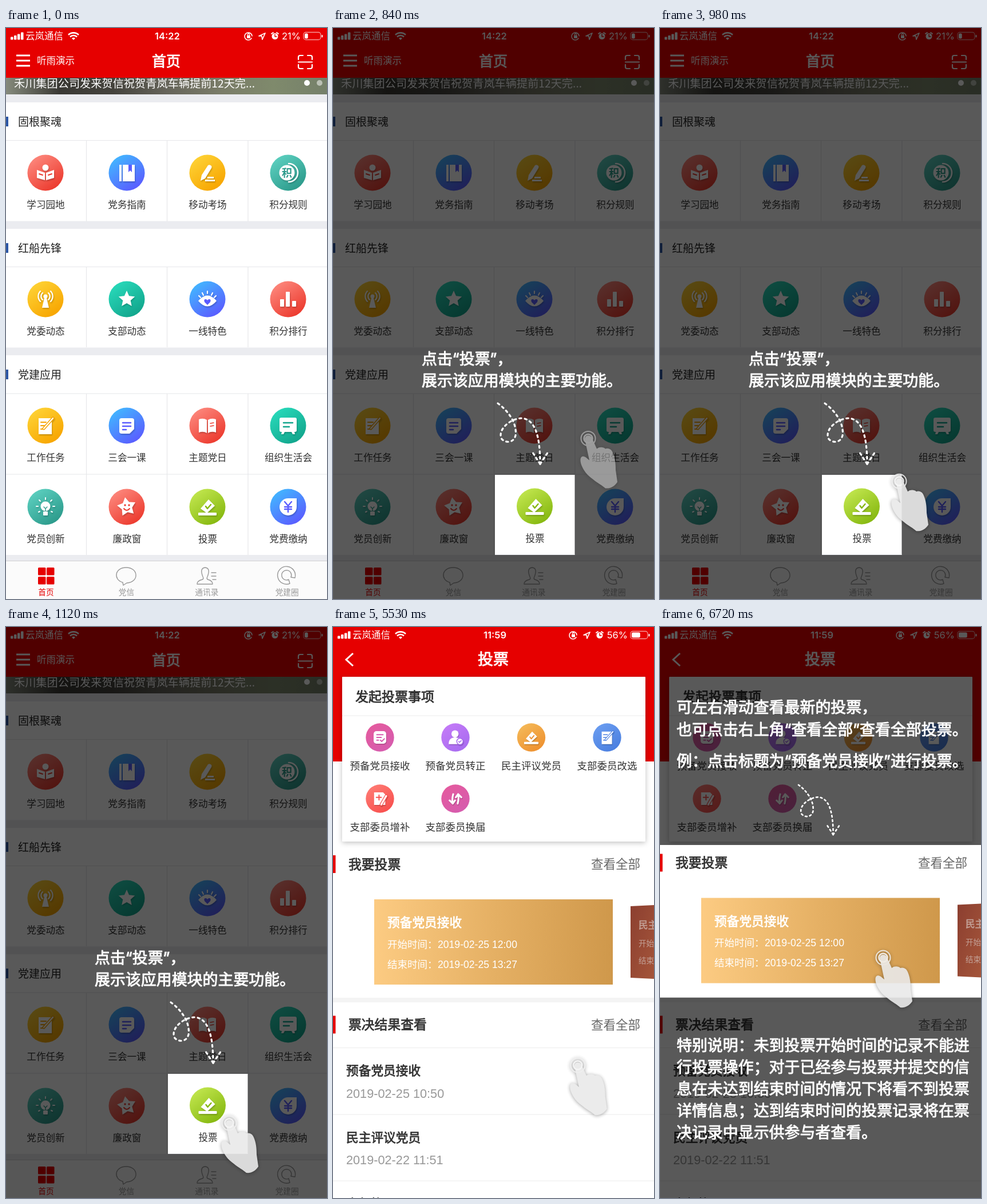
Animation, 561 px wide and 998 px high, one loop 8 s. Source, as an HTML page:

```html
<!DOCTYPE html>
<html lang="zh-CN">
<head>
<meta charset="utf-8">
<title>投票演示</title>
<style>
html, body { margin: 0; width: 100%; height: 100%; overflow: hidden; background: #fff; }
svg { display: block; width: 100%; height: 100%; }
text { font-family: "Noto Sans CJK SC", "Noto Sans CJK", sans-serif; white-space: pre; stroke-width: 0; }
.bold { stroke-width: .035em; stroke-linejoin: round; }
.latin { font-family: "Liberation Sans", sans-serif; }
.tip text, .clock { font-family: Inter, "Noto Sans CJK SC", "Noto Sans CJK", sans-serif; }
.glyph { filter: drop-shadow(1px 2px 1px rgba(0,0,0,.2)); }
.card { filter: drop-shadow(0 2px 5px rgba(0,0,0,.25)); }
#hand { filter: drop-shadow(0 1px 3px rgba(0,0,0,.4)); }
</style>
</head>
<body>
<svg id="stage" viewBox="0 0 561 998"></svg>
<script>
const RED = '#e60000', BOLD = 'class="bold"', MID = 'text-anchor="middle"', END = 'text-anchor="end"';

// Shape helpers; text is placed by its vertical centre.
const text = (x, y, size, str, fill = '#333', attrs = '') =>
  `<text x="${x}" y="${y + size * .38}" font-size="${size}" fill="${fill}" stroke="${fill}" ${attrs}>${str}</text>`;
const rect = (x, y, w, h, fill, rx = 0, attrs = '') =>
  `<rect x="${x}" y="${y}" width="${w}" height="${h}" rx="${rx}" fill="${fill}" ${attrs}/>`;
const circle = (x, y, r, fill = '#fff', attrs = '') => `<circle cx="${x}" cy="${y}" r="${r}" fill="${fill}" ${attrs}/>`;
const shape = (d, fill = '#fff') => `<path d="${d}" fill="${fill}"/>`;
const line = (d, stroke = '#fff', w = 2.5, attrs = 'stroke-linecap="round" stroke-linejoin="round"') =>
  `<path d="${d}" fill="none" stroke="${stroke}" stroke-width="${w}" ${attrs}/>`;
const star = (R, r) => 'M' + Array.from({ length: 10 }, (_, i) => {
  const a = i * Math.PI / 5 - Math.PI / 2, q = i % 2 ? r : R;
  return (q * Math.cos(a)).toFixed(1) + ' ' + (q * Math.sin(a)).toFixed(1);
}).join('L') + 'Z';

const palette = {
  red: ['#ff9287', '#ec3a2e'], blue: ['#3fc3ff', '#5a5cff'], yellow: ['#ffd83c', '#f7a500'],
  jade: ['#62d6c6', '#2c9a8b'], teal: ['#2be0c0', '#12a58c'], green: ['#c9ec56', '#86b810'],
  gold: ['#f5bd5c', '#ee9130'], pink: ['#e65a9c', '#d65cae'], purple: ['#c77cf8', '#a86cf0'],
  sky: ['#6ea0f2', '#4a7fe0'], coral: ['#ff8078', '#f8504e']
};
const gradient = (id, stops, x2, y2) => `<linearGradient id="${id}" x1="0" y1="0" x2="${x2}" y2="${y2}">` +
  stops.map((c, i) => `<stop offset="${i / (stops.length - 1)}" stop-color="${c}"/>`).join('') + '</linearGradient>';

// White symbols drawn around 0,0; c is the colour of their cut-out details.
const glyphs = {
  reader: c => circle(0, -9, 5.5) + shape('M-15-5L-1 0V13L-15 9ZM15-5L1 0V13L15 9Z') + line('M-11 2l6 2M11 2l-6 2', c, 2),
  book: c => rect(-13, -14, 4, 29, '#fff') + rect(-7, -14, 21, 29, '#fff') + shape('M3-14h6v13l-3-3-3 3Z', c),
  pencil: () => shape('M-12 14l2-10L1-13q3-2 6 1 1 2 0 4L-4 10Z') + rect(0, 7, 11, 3, '#fff') + rect(-4, 12, 17, 3, '#fff'),
  points: c => circle(-2, 0, 13.5) + line('M1-16A16 16 0 0 1 1 16', '#fff', 2.5) + text(-2, 0, 18, '积', c, MID + ' font-weight="700"'),
  antenna: () => circle(0, -5, 3.5) + shape('M-2-2h4l4 17h-12Z') +
    line('M-5 1a8 8 0 0 1 0-12M5 1a8 8 0 0 0 0-12M-9 4a13 13 0 0 1 0-18M9 4a13 13 0 0 0 0-18', '#fff', 2.2),
  star: () => shape(star(15, 7)),
  eye: c => shape('M-16 3Q0-16 16 3Q0 22-16 3Z') + shape('M0 10l-5-5q-2-5 2-5 2 0 3 2 1-2 3-2 4 0 2 5Z', c) +
    line('M0-14v4M-9-11l2 4M9-11l-2 4M-15-6l3 3M15-6l-3 3', '#fff', 2.2),
  bars: () => rect(-14, 0, 7, 13, '#fff', 1) + rect(-4, -13, 7, 26, '#fff', 1) + rect(7, 3, 7, 10, '#fff', 1),
  task: c => rect(-12, -13, 23, 28, '#fff') + line('M-8-6h9M-8 0h6M-8 6h6', c, 2) + line('M-3 5L13-13', c, 5) + line('M-3 5L13-13', '#fff', 2.2),
  minutes: c => shape('M-9-13h18q4 0 4 4V6l-8 8H-9q-4 0-4-4V-9q0-4 4-4Z') + line('M-7-5H7M-7 1H7M-7 7h6', c),
  pages: c => shape('M-15-11q8-3 14 1V13q-6-4-14-1ZM15-11q-8-3-14 1V13q6-4 14-1Z') + line('M5-4l6-1M5 1l6-1', c, 1.5),
  board: c => shape('M-12-14h24q3 0 3 3V8q0 3-3 3h-1l1 4h-4l-2-4h-12l-2 4h-4l1-4h-1q-3 0-3-3v-19q0-3 3-3Z') + line('M-8-5H8M-8 2H2', c),
  bulb: c => circle(0, -1, 8.5) + rect(-4, 8, 8, 7, '#fff', 1) + line('M-3 0l3 3 3-3M0 3v4', c, 1.4) +
    line('M0-16v3M-11-12l2 2M11-12l-2 2M-16-1h3M16-1h-3M-12 9l2-1M12 9l-2-1', '#fff', 2),
  smile: c => `<g transform="rotate(-10)">${shape(star(17, 9.5))}</g>` + circle(-3, -3, 1.7, c) + circle(4, -3, 1.7, c) + line('M-5 3q5 6 10 0', c, 2),
  vote: c => shape('M-12 3L2-13 13-2-1 11Z') + line('M-3-1l3 4 6-7', c) + rect(-16, 10, 32, 5, '#fff', 1),
  fee: c => shape('M15-15V0A15 15 0 1 1 0-15Z') + line('M-6-9l6 7 6-7M0-2V9M-6 0H6M-6 4H6', c, 2.4),
  form: c => rect(-14, -14, 28, 28, '#fff', 6) + line('M-7-6H7M-7 0H3M-7 6h4M1 6l3 3 6-6', c),
  member: c => circle(-1, -8, 8) + shape('M-15 15q0-15 14-15t14 15Z') + circle(10, 9, 7, '#fff', `stroke="${c}" stroke-width="2"`) + line('M7 9l2 2 4-4', c, 2),
  add: c => shape('M-13-14h20l5 5v23h-25Z') + line('M-8-3H3M-2-8V3', c) + line('M3 13L14-6', c, 7) + line('M3 13L14-6', '#fff', 4),
  swap: () => line('M-5-10Q-8 0-6 11M-13 4l7 7 5-7M5 11Q8 0 6-10M13-3l-7-7-5 7', '#fff', 4)
};
const icon = (x, y, r, tone, glyph) =>
  circle(x, y, r, `url(#${tone})`) +
  `<g class="glyph" transform="translate(${x} ${y}) scale(${r / 31.5})">${glyphs[glyph](palette[tone][1])}</g>`;

const statusBar = (time, timeX, percent, level, dx) =>
  [5, 7.5, 10, 13].map((h, i) => rect(8 + i * 6, 20.5 - h, 4.5, h, '#fff', 1)).join('') +
  text(34, 14, 16.5, '云岚通信', '#fff') +
  line('M109 12a13 13 0 0 1 18 0M112 15.5a8.5 8.5 0 0 1 12 0', '#fff', 2.6, '') + shape('M118 21l-3-3a4.2 4.2 0 0 1 6 0Z') +
  text(timeX, 14, 16.5, time, '#fff', MID + ' class="clock" font-weight="600"') +
  `<g transform="translate(${dx} 0)">` +
  line('M429 18a6.5 6.5 0 1 1 1-4', '#fff', 1.6) + rect(421, 13, 6, 5, '#fff', 1) + line('M422.5 13v-2a1.5 1.5 0 0 1 3 0v2', '#fff', 1.3) +
  line('M442 14l11-5-5 11-1-6Z', '#fff', 1.7) +
  circle(470, 14.5, 5.5) + line('M470 11v4h3', RED, 1.4) + line('M464 10l3-2M476 10l-3-2', '#fff', 2) + '</g>' +
  text(515, 14, 16.5, percent, '#fff', END + ' class="clock"') +
  rect(520, 7.5, 30, 13, 'none', 4, 'stroke="#fff" stroke-opacity=".6" stroke-width="1.3"') +
  rect(522, 9.5, 26 * level, 9, '#fff', 2) + rect(551.5, 12, 2, 4.5, '#fff', 1);

const columns = [69, 211, 352, 493];
const iconRow = (y, items) => items.map(([label, tone, glyph], i) =>
  icon(columns[i], y, 31.5, tone, glyph) + text(columns[i] + .5, y + 56, 16.6, label, '#333', MID)).join('');
const section = (y, title) => rect(0, y - 9, 4, 17, '#2b56a5') + text(21, y, 19, title, '#222');
const grid = (top, bottom) => line(`M0 ${top}H561` + [140.5, 281.5, 423].map(x => `M${x} ${top}V${bottom}`).join(''), '#e6e7ea', 1.2, '');

const home = rect(0, 0, 561, 998, '#fff') + rect(0, 0, 561, 87, RED) + statusBar('14:22', 282, '21%', .22, 0) +
  line('M18 48H42M18 57H42M18 66H42', '#fff', 3.2, '') + text(54, 57, 16.5, '听雨演示', '#fff') +
  text(280, 57, 25, '首页', '#fff', MID + ' ' + BOLD) +
  line('M511 55v-4q0-3 3-3h5M527 48h5q3 0 3 3v4M535 64v4q0 3-3 3h-5M519 71h-5q-3 0-3-3v-4M511 59.5H535', '#fff', 2.2) +
  rect(0, 87, 561, 29, 'url(#photo)') +
  text(14, 96.5, 19.2, '禾川集团公司发来贺信祝贺青岚车辆提前12天完...', '#fff') +
  circle(526, 96, 5) + circle(548, 96, 5, '#fff', 'opacity=".5"') +
  [[116, 14], [337.5, 13.5], [558.5, 13.5], [921, 10]].map(([y, h]) => rect(0, y, 561, h, '#ebecf0')).join('') +
  grid(196.5, 338) + grid(417.5, 558) + grid(639, 921) + line('M0 780H561', '#e6e7ea', 1.2, '') +
  section(164, '固根聚魂') + section(385, '红船先锋') + section(606, '党建应用') +
  iconRow(253, [['学习园地', 'red', 'reader'], ['党务指南', 'blue', 'book'], ['移动考场', 'yellow', 'pencil'], ['积分规则', 'jade', 'points']]) +
  iconRow(474, [['党委动态', 'yellow', 'antenna'], ['支部动态', 'teal', 'star'], ['一线特色', 'blue', 'eye'], ['积分排行', 'red', 'bars']]) +
  iconRow(695, [['工作任务', 'yellow', 'task'], ['三会一课', 'blue', 'minutes'], ['主题党日', 'red', 'pages'], ['组织生活会', 'teal', 'board']]) +
  iconRow(837, [['党员创新', 'jade', 'bulb'], ['廉政窗', 'red', 'smile'], ['投票', 'green', 'vote'], ['党费缴纳', 'blue', 'fee']]) +
  rect(0, 931, 561, 67, '#fbfbfb') + line('M0 931.5H561', '#d0d0d3', 1.2, '') +
  [[56, 943], [71, 943], [56, 959], [71, 959]].map(([x, y]) => rect(x, y, 13.5, 13.5, RED, 1.5)).join('') +
  line('M204 969C187 964 190 943 210 943C232 943 233 969 211 970L205 974Z', '#999', 1.4) +
  line('M334 972q0-6 9-8 3-1 1-5-6-15 4-16 10 1 4 16-2 4 1 5 8 2 8 8ZM359 952h8M359 958h8M361 964h6', '#999', 1.4) +
  line('M496 971A15.5 15.5 0 1 1 505 961L498 960A8.5 8.5 0 1 0 494 964Z', '#999', 1.4) +
  ['首页', '党信', '通讯录', '党建圈'].map((s, i) => text(70 + i * 140.4, 986, 13.7, s, i ? '#999' : RED, MID)).join('');

const voteItem = (x, y, label, tone, glyph) => icon(x, y, 24.7, tone, glyph) + text(x, y + 49, 17.5, label, '#333', MID);
const heading = (y, title) => rect(0, y - 15, 4.5, 31, RED) + text(27, y, 22.8, title, '#333', BOLD) + text(537, y, 21.5, '查看全部', '#666', END);
const period = (y, label, date) => text(95, y, 17.5, label, '#fff') + text(183, y, 17.6, date, '#fff', 'class="latin"');
const result = (y, title, date) => line(`M0 ${y - 39.5}H561`, '#ececec', 1.2, '') +
  text(23, y, 21.7, title, '#333', BOLD) + text(23, y + 39.5, 21.7, date, '#999', 'class="latin"');

const vote = rect(0, 0, 561, 998, '#fff') + rect(0, 0, 561, 235, RED) + statusBar('11:59', 283, '56%', .57, -4) +
  line('M35 46L23 57L35 68', '#fff', 3, '') + text(280, 56, 27, '投票', '#fff', MID + ' ' + BOLD) +
  rect(16, 87, 530, 288, '#fff', 1, 'class="card"') + text(39, 121, 23, '发起投票事项', '#333', BOLD) +
  line('M16 155H546', '#ececec', 1.2, '') +
  voteItem(82, 193, '预备党员接收', 'pink', 'form') + voteItem(214, 193, '预备党员转正', 'purple', 'member') +
  voteItem(346.5, 193, '民主评议党员', 'gold', 'vote') + voteItem(479, 193, '支部委员改选', 'sky', 'task') +
  voteItem(82, 300, '支部委员增补', 'coral', 'add') + voteItem(214, 300, '支部委员换届', 'pink', 'swap') +
  heading(414, '我要投票') + rect(72, 476, 417, 149, 'url(#ticket)') +
  text(95, 516, 21.7, '预备党员接收', '#fff', BOLD) +
  period(554, '开始时间：', '2019-02-25 12:00') + period(589, '结束时间：', '2019-02-25 13:27') +
  shape('M520 488L561 486V615L520 613Z', 'url(#rust)') +
  text(534, 521, 16.5, '民主评议党员', '#c3a096', BOLD) + text(534, 553, 13.5, '开始时间', '#c3a096') + text(534, 583, 13.5, '结束时间', '#c3a096') +
  rect(0, 648, 561, 8, '#f4f4f4') + heading(694.5, '票决结果查看') +
  result(775, '预备党员接收', '2019-02-25 10:50') + result(891.5, '民主评议党员', '2019-02-22 11:51') + result(1007.5, '支部换届', '');

const tipLines = (x, ys, lines) => lines.map((s, i) => text(x, ys[i], 26.95, s, '#fff', BOLD)).join('');
const arrow = (x, y, scale) => `<g transform="translate(${x} ${y}) scale(${scale})">` +
  ['M0 0C17 12 34 34 31 56C28 70 12 70 6 61C0 44 24 26 42 26C64 28 74 54 74 106', 'M74 106L61 86', 'M74 106L88 85']
    .map(d => line(d, '#fff', 3.2, 'stroke-dasharray="3.5 6" stroke-linecap="round"')).join('') + '</g>';
const spotlight = (page, clip, dx, dy) => rect(0, 0, 561, 998, '#000', 0, 'opacity=".65"') +
  `<g clip-path="url(#${clip})"><use href="#${page}" transform="translate(${dx} ${dy})"/></g>`;

const voteTip = spotlight('home', 'cell', .5, -1) + arrow(288, 656, 1) +
  tipLines(155, [578, 616], ['点击“投票”，', '展示该应用模块的主要功能。']);
const cardTip = spotlight('vote', 'band', 0, -2.5) + arrow(242, 276, .82) +
  tipLines(29, [140, 179, 234], ['可左右滑动查看最新的投票，', '也可点击右上角“查看全部”查看全部投票。', '例：点击标题为“预备党员接收”进行投票。']) +
  tipLines(29, [731, 769, 807, 845, 883], ['特别说明：未到投票开始时间的记录不能进', '行投票操作；对于已经参与投票并提交的信',
    '息在未达到结束时间的情况下将看不到投票', '详情信息；达到结束时间的投票记录将在票', '决记录中显示供参与者查看。']);

const hand = shape('M-6 1C-6-7 5-7 7 0L15 18C20 14 27 15 30 18C35 16 41 19 43 25C47 34 48 44 48 55L51 76C46 84 38 88 30 87' +
    'C25 82 16 78 8 71C-2 64-8 56-12 46C-16 34-12 28-4 33L2 38Z', '#e9e9e9') +
  circle(0, 0, 12.5, 'none', 'stroke="#eee" stroke-width="2"') + circle(0, 0, 7.5, 'none', 'stroke="#f4f4f4" stroke-width="2.5"');

const group = (id, content, cls = '') => `<g id="${id}" class="${cls}">${content}</g>`;
const stage = document.getElementById('stage');
stage.innerHTML = '<defs>' +
  Object.entries(palette).map(([id, stops]) => gradient(id, stops, .7, 1)).join('') +
  gradient('photo', ['#858a7c', '#3a3934', '#45433d', '#66645a', '#7a7c68', '#7f8a6c', '#75806a'], 1, 0) +
  gradient('ticket', ['#fccb82', '#e5b064', '#cf984b'], 1, 0) + gradient('rust', ['#8c3f30', '#a4553a'], 1, 1) +
  `<clipPath id="cell">${rect(283, 781, 139.5, 140, '#fff')}</clipPath>` +
  `<clipPath id="band">${rect(0, 381, 561, 266.5, '#fff')}</clipPath></defs>` +
  group('home', home) + group('vote', vote) + group('voteTip', voteTip, 'tip') + group('cardTip', cardTip, 'tip') + group('hand', hand);

const TIP = 770, OPEN = 5460, EXPLAIN = 6720, LOOP = 8000, STEP = 70;
const node = id => document.getElementById(id);
const show = (id, on) => { node(id).style.display = on ? '' : 'none'; };

// The hand glides along one line; the result is how many steps it is from its resting place.
function handDistance(t) {
  if (t < OPEN) return Math.max(0, 4 - Math.floor((t - TIP - STEP) / STEP));
  return 1.7 + Math.floor((t - OPEN) / STEP);
}

function render(t) {
  const explaining = t >= EXPLAIN;
  show('home', t < OPEN);
  show('vote', t >= OPEN);
  show('voteTip', t >= TIP && t < OPEN);
  show('cardTip', explaining);
  show('hand', explaining || (t >= TIP + STEP && t < OPEN + 3 * STEP));
  const away = explaining ? 0 : handDistance(t);
  node('hand').setAttribute('transform', `translate(${390 + 14 * away} ${(explaining ? 578 : 867) - 37.4 * away})`);
  node('hand').setAttribute('opacity', Math.max(0, Math.min(.9, 1.85 - .35 * away)));
}

function tick() {
  render(performance.now() % LOOP);
  requestAnimationFrame(tick);
}
tick();
</script>
</body>
</html>
```
